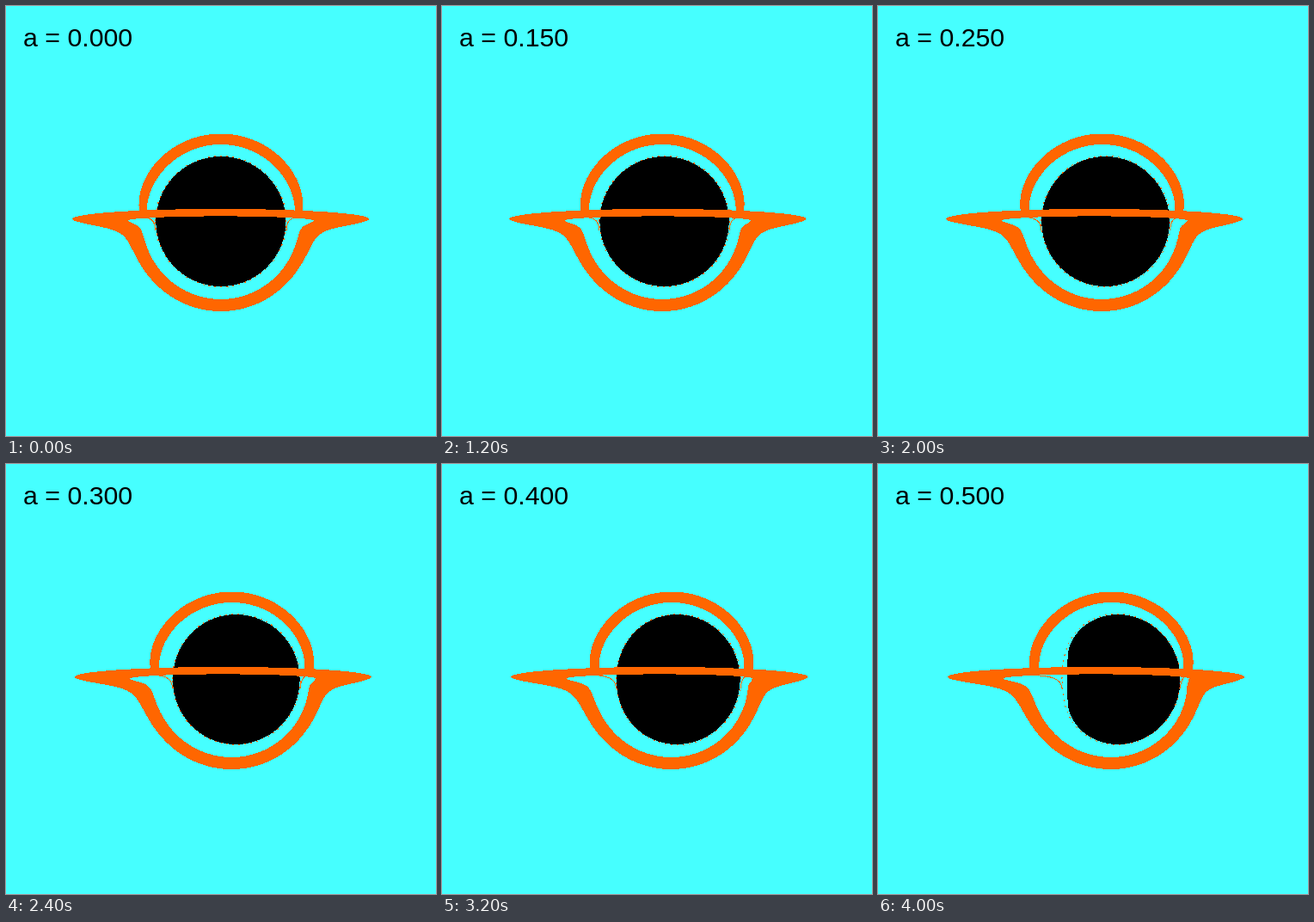
Write an HTML page that moves like this. It is 500 px wide and 500 px high and loops after 4.2 s.

```html
<!DOCTYPE html>
<html lang="en">
<head>
<meta charset="utf-8">
<title>Spinning black hole</title>
<style>
  html, body { margin: 0; width: 100%; height: 100%; overflow: hidden; background: #46ffff; }
  svg { display: block; width: 100%; height: 100%; shape-rendering: crispEdges; }
  text { font: 30.3px "Liberation Sans", Arial, sans-serif; white-space: pre; }
  .disk { fill: #ff6600; fill-rule: evenodd; }
  .line { fill: none; stroke: #ff6600; stroke-width: 1; }
  #rim { stroke-dasharray: 2 5; }
</style>
</head>
<body>
<svg viewBox="0 0 500 500">
  <path id="shadow"/>
  <path id="rim" class="line"/>
  <path id="hooks" class="line"/>
  <path id="arc" class="disk"/>
  <path id="disk" class="disk"/>
  <text id="label" x="20" y="47"></text>
</svg>
<script>
const CX = 249.8, CY = 250.5, SCALE = 29.06, MASS = 0.5;
const STEP = 200, COUNT = 21, SPIN_STEP = 0.025;
const DISK_DRIFT = 4, LENS_DRIFT = 17.5;

// Disk edges: radius, tilt, nearness to the camera, strength of the lens.
const OUTER = { r: 167.5, tilt: 0.066, near: 0.24, lens: 103.2 };
const INNER = { r: 107, tilt: 0.048, near: 0.155, lens: 90.3 };

const $ = id => document.getElementById(id);
const poly = pts => "M" + pts.map(p => p.map(v => v.toFixed(2)).join(" ")).join("L");
const sample = (n, f) => Array.from({ length: n + 1 }, (_, i) => f(i / n * 2 - 1));

// Image of a circle in the disk plane. The part behind the hole is bent
// outwards by a point lens and is dragged along with the spin.
function diskEdge({ r, tilt, near, lens }, k) {
  return sample(480, t => {
    const turn = Math.PI * t ** 3;
    const side = Math.sin(turn), back = Math.cos(turn);
    const off = Math.hypot(side, back * tilt);
    const flat = off * r / (1 + near * back);
    const behind = Math.max(0, Math.asin(back * Math.sqrt(1 - tilt * tilt)) / (Math.PI / 2));
    const bend = lens * lens * behind ** 1.5;
    const b = (flat + Math.sqrt(flat * flat + 4 * bend)) / 2;
    const drift = k * (DISK_DRIFT + LENS_DRIFT * behind);
    return [CX + drift + b * side / off, CY + b * back * tilt / off];
  });
}

// Upper image: a circle that narrows towards the disk.
function upperBow(radius, squeeze, k) {
  return sample(80, t => {
    const angle = t * 83 * Math.PI / 180;
    const b = radius * (1 - squeeze * t ** 6);
    return [CX + k * (DISK_DRIFT + LENS_DRIFT) + b * Math.sin(angle), CY - b * Math.cos(angle)];
  });
}

// Edge of the Kerr shadow from the spherical photon orbits, seen edge-on.
function kerrEdge(spin, grow) {
  const a = Math.min(Math.max(spin, 0.001), 0.4999), M = MASS, size = SCALE * grow;
  const orbit = s => 2 * M * (1 + Math.cos(2 / 3 * Math.acos(s * a / M)));
  const r0 = orbit(-1), r1 = orbit(1);
  const half = sample(90, t => {
    const r = r0 + (r1 - r0) * (1 + Math.sin(t * Math.PI / 2)) / 2;
    const xi = (r * r * (3 * M - r) - a * a * (r + M)) / (a * (r - M));
    const eta = r ** 3 * (4 * a * a * M - r * (r - 3 * M) ** 2) / (a * (r - M)) ** 2;
    return [CX - xi * size, Math.sqrt(Math.max(eta, 0)) * size];
  });
  return [...half.map(([x, y]) => [x, CY - y]), ...half.reverse().map(([x, y]) => [x, CY + y])];
}

// Thin tail of the next image, from the disk down to the shadow.
const hook = (from, to) => `M${from} 246Q${to} 248 ${to} 261`;

function draw(i) {
  const spin = i * SPIN_STEP, k = spin / MASS;
  const rim = kerrEdge(Math.min(spin, 0.485), 1.008);
  const xs = rim.map(p => p[0]);
  const set = (id, d) => $(id).setAttribute("d", d);

  set("shadow", poly(kerrEdge(spin, 1)) + "Z");
  set("rim", poly(rim) + "Z");
  set("hooks", hook(164 + 24 * k, Math.min(...xs)) + hook(336 + 24 * k, Math.max(...xs)));
  set("arc", poly([...upperBow(102, 0.065, k), ...upperBow(89.5, 0.03 + 0.03 * k, k).reverse()]) + "Z");
  set("disk", poly(diskEdge(OUTER, k)) + "Z" + poly(diskEdge(INNER, k)) + "Z");
  $("label").textContent = "a = " + spin.toFixed(3);
}

let shown = -1;
const start = performance.now();
function tick(now) {
  const i = Math.floor(Math.max(now - start, 0) / STEP) % COUNT;
  if (i !== shown) draw(shown = i);
  requestAnimationFrame(tick);
}
tick(start);
</script>
</body>
</html>
```
